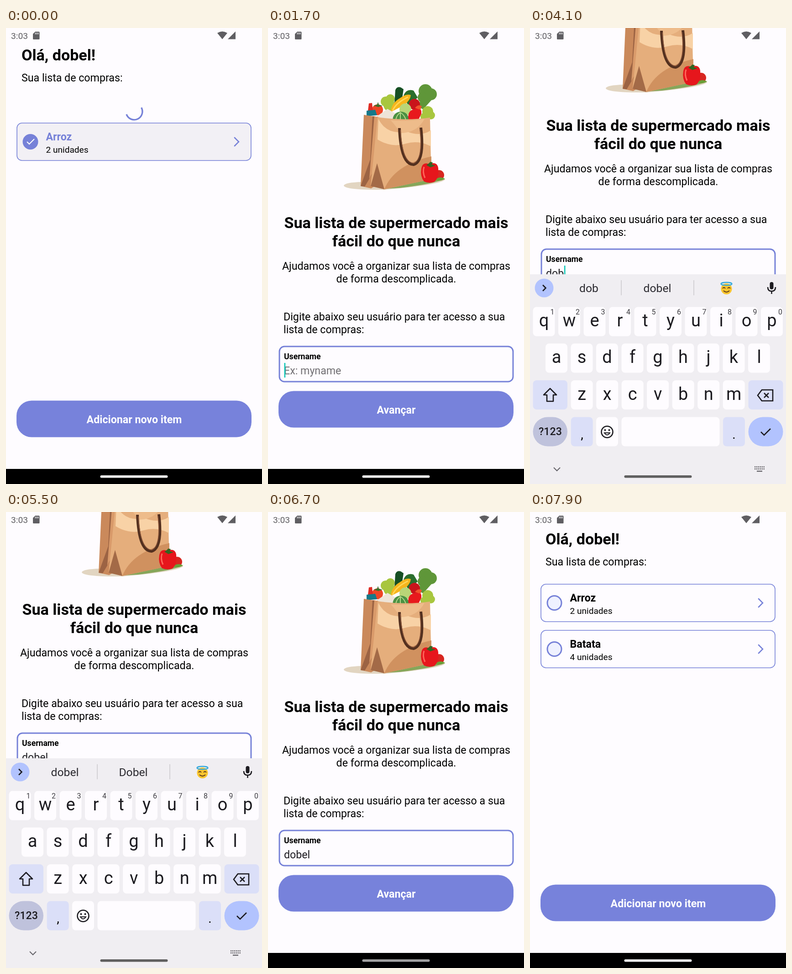
These frames come from a looping animation (561 px wide and 998 px high, 8000 ms). An HTML page:

```html
<!DOCTYPE html>
<html lang="pt">
<head>
<meta charset="utf-8">
<style>
  html, body { margin: 0; width: 100%; height: 100%; overflow: hidden; background: #fefcff; }
  svg { display: block; width: 100vw; height: 100vh; font: 23.2px Roboto, sans-serif; }
  .h1 { font-size: 34.1px; font-weight: 700; }
  .b { font-weight: 700; }
  .mid { text-anchor: middle; }
  .line { fill: none; stroke: #1c1b20; stroke-width: 2.6; }
  .key { font-size: 38px; fill: #1c1b20; }
  .sug { font-size: 24.7px; fill: #2b2a30; }
</style>
</head>
<body>
<svg viewBox="0 0 561 998">
  <rect width="561" height="998" fill="#fefcff"/>

  <g id="login">
    <g id="bag">
      <path d="M166 345Q168 338 205 337L360 326Q392 327 387 333Q370 344 255 354Q170 355 166 345Z" fill="#e2d5c1"/>
      <path d="M255 352L350 330 388 330Q365 341 290 350Z" fill="#86a65a"/>
      <g fill="#5f9639">
        <circle cx="345" cy="138" r="15"/><circle cx="357" cy="145" r="13"/><circle cx="339" cy="152" r="11"/>
        <path d="M338 150L358 158 340 178 328 172Z"/>
      </g>
      <g fill="#a8c63f">
        <circle cx="258" cy="161" r="11"/><circle cx="268" cy="155" r="10"/><circle cx="266" cy="169" r="13"/>
        <circle cx="350" cy="183" r="12"/><circle cx="357" cy="191" r="9"/><circle cx="343" cy="194" r="9"/>
      </g>
      <path d="M277 168L279 136Q282 127 291 130L297 134 292 168Z" fill="#164f24"/>
      <path d="M297 148Q303 132 319 137L328 152 308 172Z" fill="#2b6e2e"/>
      <circle cx="321" cy="167" r="12" fill="#c9141b"/>
      <path d="M269 184Q270 164 290 153Q304 143 313 147Q312 158 298 169Z" fill="#f6b51c"/>
      <path d="M273 181Q280 164 307 151" fill="none" stroke="#ffd657" stroke-width="3"/>
      <circle cx="301" cy="178" r="13" fill="#b9d577"/>
      <path d="M307 200Q306 180 320 178Q338 171 336 188L330 200Z" fill="#e8191d"/>
      <path d="M322 175Q329 166 337 171L334 179Z" fill="#f0522d"/>
      <circle cx="240" cy="179" r="12" fill="#ee4526"/>
      <path d="M231 170l8-2 2-6 2 6 8 2-9 3Z" fill="#39702b"/>
      <path d="M221 165l7-1 2 19-11-2Z" fill="#df2b24"/>
      <path d="M216 181l19-2 4 12-23 2Z" fill="#15798a"/>
      <path d="M236 195L262 177 279 187 274 201Z" fill="#eee4d8"/>
      <path d="M273 201Q275 184 291 183Q308 184 308 201Z" fill="#4b9143"/>
      <path d="M280 201Q282 190 290 185Q299 190 302 201M290 185V201" fill="none" stroke="#b8d88c" stroke-width="2"/>
      <path d="M210 190L242 195 236 345 226 351 203 346Z" fill="#ca895b"/>
      <path d="M229 193L242 195 240 300 212 347 203 346 224 288Z" fill="#9c6343"/>
      <path d="M233 193L242 195 239 298 222 330Z" fill="#d99a6a"/>
      <path d="M240 195Q300 204 355 196L358 331 255 353 225 345Z" fill="#e5ae7c"/>
      <path d="M239 296L255 353 225 346Z" fill="#a36a47"/>
      <path d="M240 244Q271 263 302 253Q330 245 357 259V224Q334 239 303 226Q261 236 242 199Z" fill="#f8d2a6"/>
      <path d="M255 353Q276 300 358 281V331Z" fill="#d0915f"/>
      <path d="M269 202Q284 219 290 230Q326 230 343 199Q308 205 269 202Z" fill="#eebc8b"/>
      <path d="M288 219Q291 299 319 299Q344 292 335 218" fill="none" stroke="#53301f" stroke-width="6"/>
      <path d="M290 223Q294 294 319 296Q340 288 333 222" fill="none" stroke="#8a553a" stroke-width="1.5"/>
      <circle cx="375" cy="322" r="11" fill="#d82620"/>
      <path d="M366 332Q377 323 388 330Q378 337 366 332Z" fill="#6b9e38"/>
      <path d="M336 307Q339 292 354 298Q370 291 373 306Q375 329 364 337Q353 341 342 336Q333 325 336 307Z" fill="#e6161c"/>
      <path d="M342 304Q338 315 344 328" fill="none" stroke="#ff6559" stroke-width="3"/>
      <path d="M347 300Q355 295 355 293l6 1-2 5 8 2-11 4Z" fill="#326522"/>
    </g>
    <g class="h1 mid">
      <text x="281" y="438">Sua lista de supermercado mais</text>
      <text x="281" y="478">fácil do que nunca</text>
    </g>
    <g class="mid">
      <text x="281" y="529">Ajudamos você a organizar sua lista de compras</text>
      <text x="281" y="556.5">de forma descomplicada.</text>
    </g>
    <text x="34" y="640">Digite abaixo seu usuário para ter acesso a sua</text>
    <text x="34" y="668">lista de compras:</text>
    <rect x="25" y="697" width="512" height="77" rx="11" fill="#fefcff" stroke="#7681d8" stroke-width="3"/>
    <text x="35" y="725" class="b" font-size="17.6">Username</text>
    <text id="hint" x="35" y="758" fill="#716f73">Ex: myname</text>
    <text id="typed" x="35" y="758" fill="#1c1b20"></text>
    <rect id="caret" y="733" width="2.7" height="32" fill="#14c8b8"/>
    <rect x="23" y="794.5" width="515" height="80" rx="33" fill="#7782db"/>
    <text x="281" y="843.5" class="b mid" fill="#fff">Avançar</text>
  </g>
  <rect y="965" width="561" height="33"/>

  <g id="list">
    <rect width="561" height="965" fill="#fefcff"/>
    <text x="34" y="71" class="h1">Olá, dobel!</text>
    <text x="34" y="117">Sua lista de compras:</text>
    <path id="spinner" d="M15.6-9A18 18 0 1 1-17 6" fill="none" stroke="#7681d8" stroke-width="3.4"/>
    <g id="before"></g>
    <g id="after"></g>
    <rect x="23" y="815.5" width="515" height="80" rx="33" fill="#7782db"/>
    <text x="281" y="865" class="b mid" fill="#fff">Adicionar novo item</text>
  </g>

  <g id="keyboard">
    <rect y="539" width="561" height="460" fill="#f0eef2"/>
    <g id="keys"></g>
    <circle cx="31" cy="569" r="20.5" fill="#b2c3fe"/>
    <path id="arrow" d="M3-6.5L-3.5 0 3 6.5" class="line"/>
    <g id="tools">
      <path d="M101 558h20q2 0 2 2v13l-7 8h-15q-2 0-2-2v-19q0-2 2-2ZM122 573h-6v7M105 571q6 7 11-1M104 565h3M113 565h4" class="line"/>
      <text x="191" y="576.5" class="b mid" font-size="21" fill="#1c1b20">GIF</text>
      <path d="M265 560h-5v21h22v-21h-5M266 557h10v6h-10ZM264 568h14M264 572h14M264 576h9" class="line" stroke-width="2"/>
      <circle cx="351" cy="569" r="6.8" class="line" style="stroke-width:6"/>
      <circle cx="351" cy="569" r="10.5" class="line" style="stroke-width:4;stroke-dasharray:5.5 5.5"/>
      <path d="M400 554v30" stroke="#c9c7cc" stroke-width="1.5"/>
      <g fill="#1c1b20"><circle cx="441" cy="569" r="2.8"/><circle cx="449" cy="569" r="2.8"/><circle cx="457" cy="569" r="2.8"/></g>
    </g>
    <g id="suggestions">
      <text id="first" x="129" y="578" class="sug mid"></text>
      <text id="second" x="279" y="578" class="sug mid"></text>
      <path d="M200 552v33M359 552v33" stroke="#c9c7cc" stroke-width="1.5"/>
      <g id="face">
        <circle cx="430.5" cy="571" r="12" fill="#fbc52f"/>
        <ellipse cx="430.5" cy="560" rx="12" ry="3.2" fill="none" stroke="#35a9dc" stroke-width="2.4"/>
        <path d="M422 570q3-4 6 0M433 570q3-4 6 0M424 575q6.500 6 13 0" fill="none" stroke="#5b3b1d" stroke-width="1.8"/>
      </g>
    </g>
    <rect x="525.500" y="556" width="8" height="16" rx="4" fill="#1c1b20"/>
    <path d="M521 567q0 9 8.500 9t8.500-9M529.500 576v6" class="line"/>
    <path d="M30 803L44 789 58 803H51V817H37V803Z" class="line" stroke-linejoin="round"/>
    <path d="M499 804L508 792H532V816H508ZM513 799l10 10M523 799l-10 10" class="line"/>
    <text x="44.500" y="891" class="mid" fill="#1c1b20" font-weight="500">?123</text>
    <circle cx="169" cy="884" r="12.500" class="line"/>
    <path d="M163 886q6 9 12 0Z" class="line" style="stroke-width:2"/>
    <g fill="#1c1b20"><circle cx="164.500" cy="880" r="2"/><circle cx="173.500" cy="880" r="2"/></g>
    <text x="114" y="899" class="mid" font-size="28">,</text>
    <text x="447" y="899" class="mid" font-size="28">.</text>
    <path d="M506 884l7 7 14-14" class="line"/>
    <path d="M52 962l7 7 7-7" class="line" style="stroke:#66646a;stroke-width:2"/>
    <path d="M492 960.500h22M492 965h22" fill="none" stroke="#66646a" stroke-width="2.400" stroke-dasharray="2.400 1.500"/>
    <path d="M497 970h12" stroke="#66646a" stroke-width="2.400"/>
  </g>

  <rect id="pill" x="206.500" y="979" width="148" height="5.500" rx="2.700"/>
  <g fill="#5f5e62">
    <text x="11" y="24" font-size="19.200">3:03</text>
    <path d="M64 8h8q1.500 0 1.500 1.500v14q0 1.500-1.500 1.500H60.500q-1.500 0-1.500-1.500V13Z"/>
    <path d="M463 11Q474 4 485 11L474 24.500ZM486 24.500L503 7.500V24.500Z"/>
    <path d="M64.500 10v4M67.500 10v4M70.500 10v4" stroke="#fefcff" stroke-width="1.300"/>
  </g>
</svg>
<script>
const $ = id => document.getElementById(id);
const show = (id, on) => $(id).setAttribute('visibility', on ? 'visible' : 'hidden');
const move = (id, x, y, turn = 0) => $(id).setAttribute('transform', `translate(${x} ${y}) rotate(${turn})`);
const ramp = (t, from, to) => Math.min(1, Math.max(0, (t - from) / (to - from)));
const ease = x => 1 - (1 - x) ** 3;

const LOOP = 8000, USER = 'dobel';
const STROKES = [2900, 3400, 3900, 4500, 5000];
const FOCUS = [1500, 2100];
const PILL = [[0, 238], [2150, 238], [2300, 196], [2700, 96], [5700, 96], [6000, 120], [6700, 160], [7900, 238]];

function row(y, name, amount, done) {
  const blue = '#7681d8';
  return `<g transform="translate(0 ${y})">
    <rect x="24" y="1" width="513" height="82" rx="11" fill="${done ? '#f2f0f5' : '#fefcff'}" stroke="${blue}" stroke-width="1.6"/>
    <circle cx="53.500" cy="42" r="15.500" fill="${done ? blue : '#eff1ff'}" stroke="${blue}" stroke-width="3"/>
    ${done ? '<path d="M46 42l5 5 11-11" fill="none" stroke="#fff" stroke-width="2"/>' : ''}
    <text x="87.500" y="38.500" class="b" fill="${done ? blue : '#000'}">${name}</text>
    <text x="87.500" y="66" font-size="19.100">${amount} unidades</text>
    <path d="M501 33l9 9-9 9" fill="none" stroke="${blue}" stroke-width="2.600" stroke-linecap="round"/></g>`;
}
$('before').innerHTML = row(207, 'Arroz', 2, true);
$('after').innerHTML = row(157, 'Arroz', 2) + row(258, 'Batata', 4);

const key = (x, y, w = 48, fill = '#fefcff', r = 8) =>
  `<rect x="${x}" y="${y}" width="${w}" height="64" rx="${r}" fill="${fill}"/>`;
let keys = key(6.5, 771, 75.5, '#dbdff8') + key(478.5, 771, 76, '#dbdff8')
  + key(6.5, 851.5, 75.5, '#bfc2dc', 32) + key(89.700, 851.5, 48, '#dbdff8') + key(145, 851.5)
  + key(200.500, 851.5, 215) + key(423, 851.5, 48, '#dbdff8') + key(478.5, 851.5, 76, '#b2c3fe', 32);
[['qwertyuiop', 6.5, 610.5], ['asdfghjkl', 34, 690.5], ['zxcvbnm', 89.7, 771]].forEach(([letters, left, y], line) =>
  [...letters].forEach((c, i) => {
    const x = left + i * 55.5;
    keys += key(x, y) + `<text x="${x + 24}" y="${y + 42.5}" class="key mid">${c}</text>`;
    if (!line) keys += `<text x="${x + 42.5}" y="627" class="mid" font-size="16" fill="#3c3b40">${(i + 1) % 10}</text>`;
  }));
$('keys').innerHTML = keys;

function pillShade(t) {
  const i = PILL.findLastIndex(p => p[0] <= t);
  const [from, a] = PILL[i], [to, b] = PILL[i + 1] || [LOOP, a];
  return Math.round(a + (b - a) * ramp(t, from, to));
}

function draw(t) {
  const up = ease(ramp(t, 1950, 2220)) - ease(ramp(t, 5680, 5950));
  move('login', 0, -213 * up);
  move('keyboard', 0, 460 * (1 - up));
  show('keyboard', up > 0);

  const count = STROKES.filter(s => s <= t).length;
  const text = USER.slice(0, count);
  $('typed').textContent = text;
  show('hint', !count);
  const lastInput = Math.max(0, ...[...FOCUS, ...STROKES].filter(s => s <= t));
  show('caret', (t - lastInput) % 1000 < 500);
  $('caret').setAttribute('x', 35.5 + (count ? $('typed').getComputedTextLength() : 0));

  show('tools', up > 0 && !count);
  show('suggestions', up > 0 && count);
  show('face', up > 0 && count > 2);
  move('arrow', 31, 569, count ? 180 : 0);
  $('first').textContent = text;
  $('second').textContent = count < 5 ? USER : USER[0].toUpperCase() + USER.slice(1);

  const listShown = t < 4000 ? 1 - ramp(t, 500, 1000) : ramp(t, 7000, 7250);
  $('list').setAttribute('opacity', listShown);
  show('before', t < 4000);
  show('after', t > 7500);
  $('after').setAttribute('opacity', ramp(t, 7450, 7600));
  show('spinner', t < 7500);
  move('spinner', 281, 183, t * 0.4);

  const shade = pillShade(t);
  $('pill').setAttribute('fill', `rgb(${shade},${shade},${shade})`);
}

function frame() {
  draw(performance.now() % LOOP);
  requestAnimationFrame(frame);
}
frame();
</script>
</body>
</html>
```
